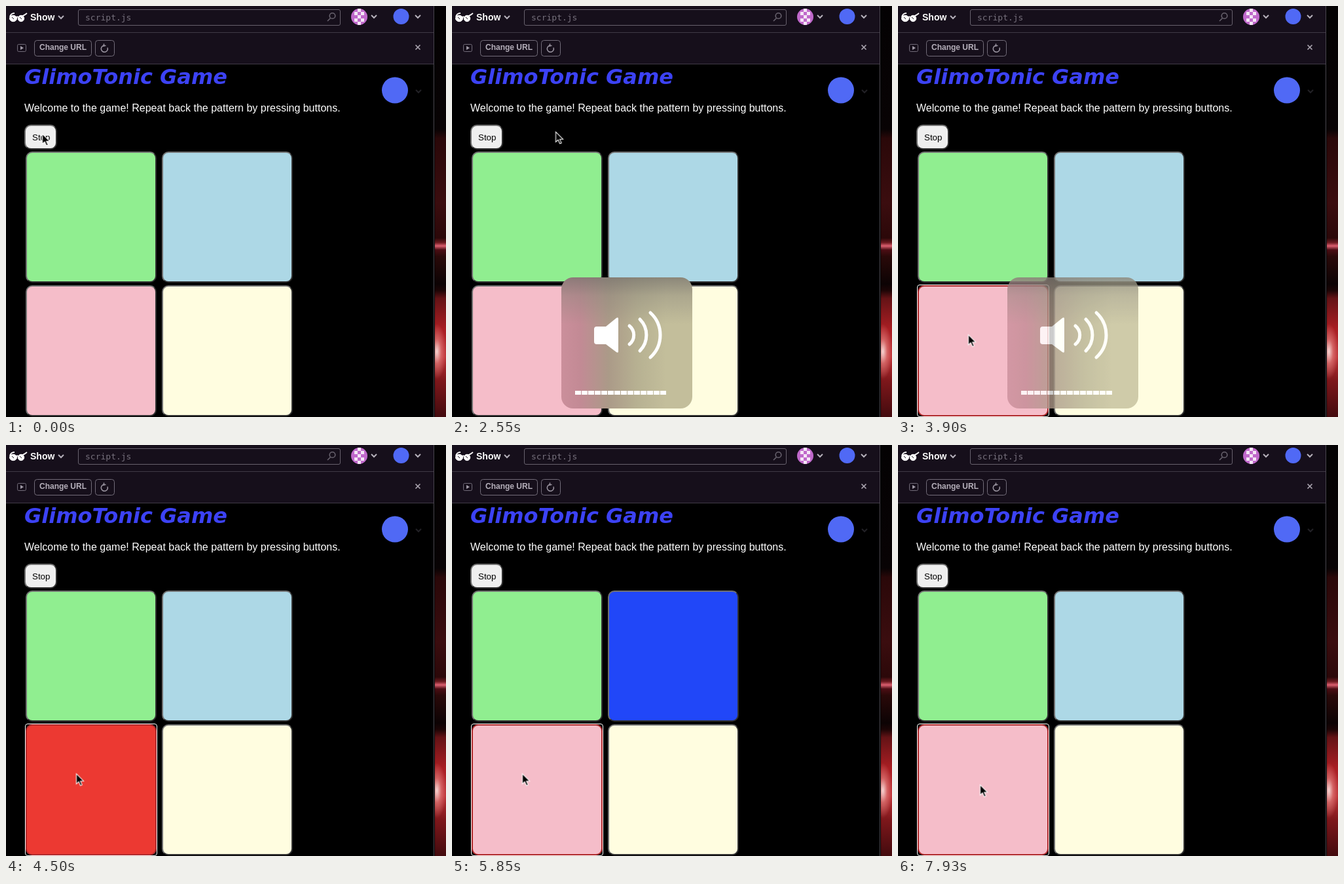
An HTML page for the animation above (8000 ms loop, 672x627 px).

```html
<!DOCTYPE html>
<html lang="en">
<head>
<meta charset="utf-8">
<title>Memory game</title>
<style>
  html, body { margin: 0; width: 100%; height: 100%; overflow: hidden; background: #000; }
  .stage { position: relative; width: 672px; height: 627px; overflow: hidden; background: #000; }
  .stage > * { position: absolute; box-sizing: border-box; }
  svg { display: block; overflow: hidden; }
  text { font-family: "Liberation Sans", Arial, sans-serif; }

  .wall {
    left: 655px; top: 0; width: 17px; height: 627px;
    background:
      radial-gradient(ellipse 15px 42px at 3px 527px, #f6d5d3, #e8888699 45%, transparent),
      linear-gradient(#040203 0, #080304 188px, #2a0809 202px, #3b0d0f 300px, #2b0809 354px,
        #6d1a20 361px, #dc6070 366px, #4c0d14 372px, #2a0909 382px, #0c0304 424px,
        #1c0506 434px, #641316 446px, #a81e23 492px, #bd3034 535px, #7d171b 572px, #430b0e 627px);
  }

  .pad, .stop {
    border: 2px solid; border-radius: 10px;
    border-color: #707070 #303030 #303030 #707070;
  }
  .pad { width: 200px; height: 200px; }
  .stop { left: 28px; top: 181px; width: 50px; height: 38px; background: #efefef; }
  .green { left: 30px; top: 222px; background: #90ee90; }
  .blue { left: 238px; top: 222px; background: #add8e6; animation: blue 8s step-end infinite; }
  .pink { left: 30px; top: 426px; background: #f5bdc9; animation: red 8s step-end infinite, edge 8s step-end infinite; }
  .yellow { left: 238px; top: 426px; background: #fffde0; }
  .ring {
    left: 29px; top: 425px; width: 202px; height: 202px;
    border: 1.5px solid #fff; border-radius: 4px; opacity: 0;
    animation: ring 8s step-end infinite;
  }

  .panel {
    left: 167px; top: 414px; width: 200px; height: 200px; border-radius: 18px;
    overflow: hidden; opacity: 0;
    background:
      linear-gradient(#77736dbb, #8a857a66 14%, transparent 36%),
      linear-gradient(90deg, #cb8f9b, #c38a95 14%, #ab9a88 36%, #b7b192 58%, #c3be9b 80%);
    animation: panel 8s step-end infinite;
  }
  .panel > * { position: absolute; left: 0; top: 0; width: 200px; height: 200px; }
  .glow {
    opacity: 0; animation: glow 8s step-end infinite;
    background: linear-gradient(90deg, #eb3934, #e63a35f2 15%, #d8433cb0 25%, #c9544a55 36%, transparent 52%);
  }
  .ink { animation: ink 8s step-end infinite; }
  .last { opacity: 0; animation: last 8s step-end infinite; }
  .cursor { left: -3px; top: -3px; animation: move 8s step-end infinite; }

  @keyframes red {
    0%, 24.375%, 45%, 69.375% { background: #f5bdc9; }
    11.25%, 43.125%, 56.25% { background: #ec3932; }
  }
  @keyframes blue {
    0%, 86.25% { background: #add8e6; }
    73.125% { background: #2147f8; }
  }
  @keyframes edge {
    0% { border-color: #707070 #303030 #303030 #707070; }
    43.125%, 100% { border-color: #b02b2d; }
  }
  @keyframes ring { 0% { opacity: 0; } 43.125%, 100% { opacity: 1; } }
  @keyframes panel {
    0%, 54.375% { opacity: 0; }
    26.25% { opacity: 1; }
    48.75% { opacity: .8; }
    50.625% { opacity: .5; }
    52.5% { opacity: .22; }
  }
  @keyframes glow { 0%, 45% { opacity: 0; } 43.125% { opacity: 1; } }
  @keyframes ink { 0%, 45% { stop-color: #fff; } 43.125% { stop-color: #f19490; } }
  @keyframes last { 0% { opacity: 0; } 31.875%, 100% { opacity: 1; } }
  @keyframes move {
    0% { transform: translate(55.5px, 195px); }
    5.625% { transform: translate(64px, 198px); }
    7.5% { transform: translate(96px, 201px); }
    9.375% { transform: translate(131px, 200px); }
    11.25% { transform: translate(150px, 199px); }
    15% { transform: translate(152px, 196px); }
    16.875% { transform: translate(155px, 193px); }
    18.75% { transform: translate(158.5px, 192px); }
    35.625% { transform: translate(155px, 222px); }
    37.5% { transform: translate(139px, 335px); }
    39.375% { transform: translate(116px, 465px); }
    41.25%, 73.125% { transform: translate(107.5px, 501.5px); }
    84.375% { transform: translate(105px, 511px); }
    86.25% { transform: translate(103px, 519px); }
    89.875% { transform: translate(104px, 521.5px); }
    91.725% { transform: translate(109px, 522px); }
    93.575% { transform: translate(114px, 521px); }
    95.425% { transform: translate(119px, 520px); }
    97.275% { transform: translate(123px, 519px); }
    99.125%, 100% { transform: translate(125.5px, 518.5px); }
  }
</style>
</head>
<body>
<div class="stage">
  <div class="wall"></div>

  <svg width="672" height="627" style="left:0;top:0">
    <defs>
      <path id="chevron" d="M-4 -2L0 2L4 -2" fill="none" stroke-width="2"/>
      <clipPath id="disc"><circle cx="539.5" cy="16.5" r="12.5"/></clipPath>
    </defs>
    <rect width="653" height="89" fill="#160f1b"/>
    <path d="M0 40.5H653M0 88.5H653" stroke="#403a46"/>
    <path d="M653.5 0V627" stroke="#4b474f"/>

    <!-- toolbar -->
    <g fill="#fff" stroke="#fff">
      <ellipse cx="11" cy="19" rx="5.5" ry="4.7"/>
      <ellipse cx="23" cy="19" rx="4.7" ry="4.7"/>
      <path d="M6 17Q7 11 13 11M20 17Q26 16 32 11M14 18Q17 15 20 18" fill="none" stroke-width="1.8"/>
    </g>
    <path d="M9 17l3 3M21 17l3 3" stroke="#160f1b"/>
    <text x="37" y="22" font-size="14" font-weight="700" fill="#fff">Show</text>
    <g stroke="#b5b0ba">
      <use href="#chevron" x="84" y="17"/>
      <use href="#chevron" x="562" y="16"/>
      <use href="#chevron" x="629" y="16"/>
    </g>
    <rect x="110.5" y="5.5" width="400" height="24" rx="2.5" fill="none" stroke="#67616d"/>
    <text x="121" y="22" font-size="13" fill="#77717d" style="font-family:'DejaVu Sans Mono',monospace">script.js</text>
    <g fill="none" stroke="#67616d" stroke-width="1.6">
      <circle cx="498.5" cy="15" r="4.3"/>
      <path d="M495.5 18.5L491 23"/>
    </g>
    <g clip-path="url(#disc)">
      <path d="M527 4h25v25h-25z" fill="#c069cb"/>
      <path d="M537 4h5v5h-5zM532 9h5v5h-5zM542 9h5v5h-5zM537 14h5v5h-5zM532 19h5v5h-5zM542 19h5v5h-5zM537 24h5v5h-5z" fill="#f4e6f6"/>
    </g>
    <circle cx="603.5" cy="16" r="12" fill="#5069f5"/>

    <!-- second row -->
    <g fill="none" stroke="#726c79">
      <rect x="17.5" y="58.5" width="13" height="11" rx="2"/>
      <rect x="43.5" y="52.5" width="87" height="24" rx="4"/>
      <rect x="136.5" y="52.5" width="29" height="24" rx="4"/>
    </g>
    <path d="M22 61l5 3-5 3z" fill="#a19ba7"/>
    <text x="51" y="67" font-size="12" font-weight="700" fill="#b5afba">Change URL</text>
    <path d="M149 60.5A5 5 0 1 0 155 63.5M147.5 60.5H152.5M149.5 57.5V62" fill="none" stroke="#9a94a0" stroke-width="1.5"/>
    <path d="M625.5 59.5l7 7m0-7l-7 7" stroke="#aaa4af" stroke-width="1.7"/>

    <!-- page -->
    <text x="28" y="119" font-size="32" font-weight="700" font-style="italic" fill="#3c42f5" style="font-family:'DejaVu Sans',sans-serif">GlimoTonic Game</text>
    <text x="28" y="161" font-size="16" fill="#fff">Welcome to the game! Repeat back the pattern by pressing buttons.</text>
    <circle cx="594" cy="128.5" r="20" fill="#5069f5"/>
    <use href="#chevron" x="630" y="130" stroke="#222126"/>
  </svg>

  <div class="stop"></div>
  <svg width="60" height="30" style="left:28px;top:186px"><text x="12" y="19" font-size="13.333">Stop</text></svg>

  <div class="pad green"></div>
  <div class="pad blue"></div>
  <div class="pad pink"></div>
  <div class="pad yellow"></div>
  <div class="ring"></div>

  <div class="panel">
    <div class="glow"></div>
    <svg viewBox="0 0 200 200">
      <linearGradient id="ink" gradientUnits="userSpaceOnUse" x1="20" y1="0" x2="92" y2="0">
        <stop class="ink" offset="0" stop-color="#fff"/>
        <stop offset="1" stop-color="#fff"/>
      </linearGradient>
      <path d="M54 75H68L84 62Q87 60 87 63V113Q87 116 84 114L68 102H54Q50 102 50 98V79Q50 75 54 75Z" fill="url(#ink)"/>
      <path d="M104 74A18 18 0 0 1 104 102M120 64A34 34 0 0 1 120 112M136 54A46 46 0 0 1 136 122" fill="none" stroke="#fff" stroke-width="5" stroke-linecap="round"/>
      <path d="M21 173h9v6h-9z" fill="url(#ink)"/>
      <path d="M31 176.01L150 176" fill="none" stroke="url(#ink)" stroke-width="6" stroke-dasharray="9 1"/>
      <rect class="last" x="151" y="173" width="9" height="6" fill="#fff"/>
    </svg>
  </div>

  <svg class="cursor" width="20" height="26" viewBox="-3 -3 20 26">
    <path d="M0 0V15.5L3.6 12.2L6.2 18L8.7 16.9L6.2 11.2H11Z" fill="#000" stroke="#fff" stroke-width="1.1"/>
  </svg>
</div>
</body>
</html>
```
